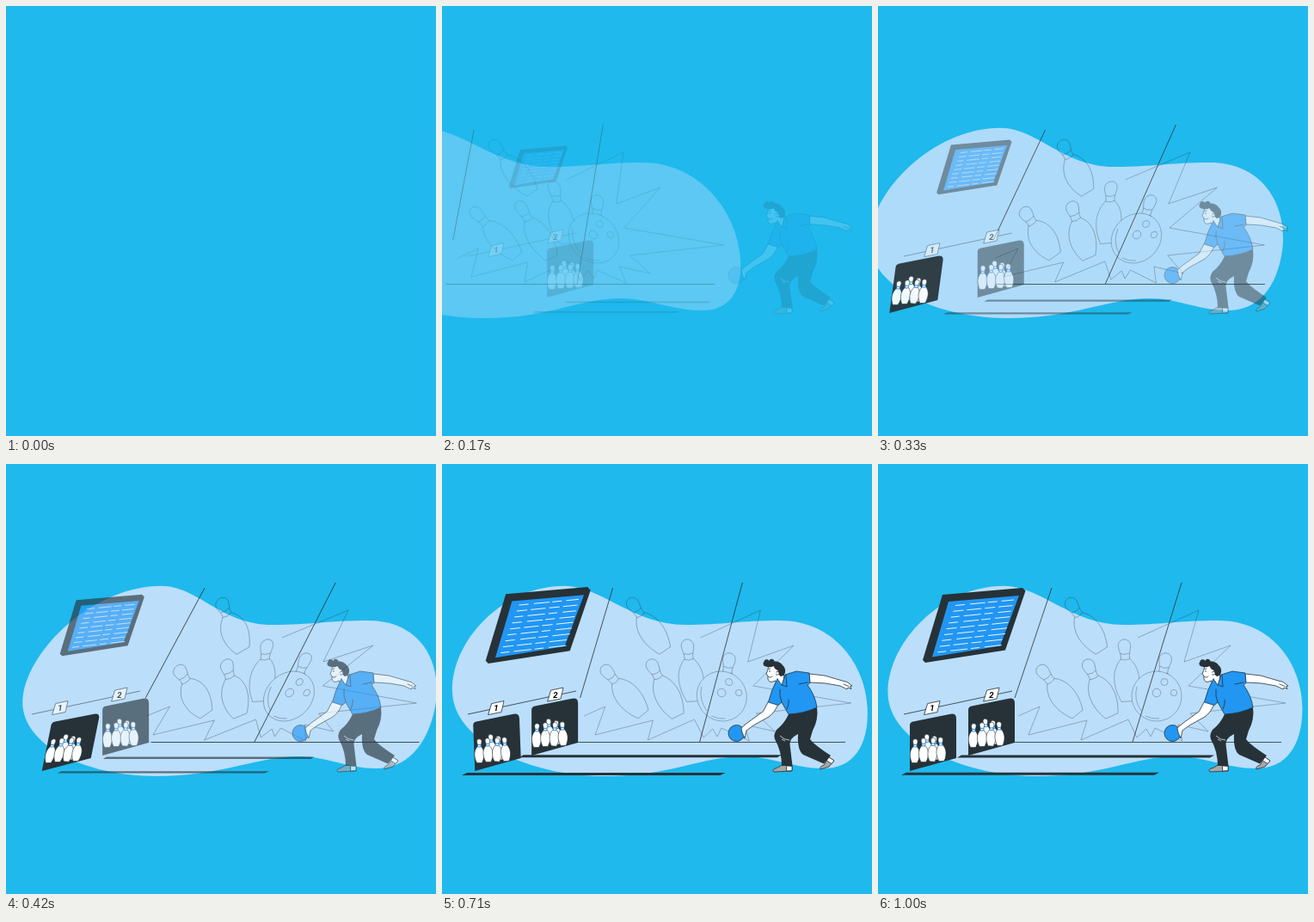
Write an HTML page that moves like this. It is 500 px wide and 500 px high and loops after 1040 ms.

```html
<!DOCTYPE html>
<html lang="en">
<head>
<meta charset="utf-8">
<title>Bowling alley</title>
<style>
  html, body { margin: 0; width: 100%; height: 100%; overflow: hidden; background: #1fb9ed; }
  svg { display: block; width: 100%; height: 100%; }
  .line { fill: none; stroke: #263238; stroke-width: .8; }
  .faint { fill: none; stroke: #263238; stroke-width: .7; stroke-opacity: .45; }
  .dark { fill: #263238; }
  .blue { fill: #2196f3; }
  .ink { stroke: #263238; stroke-width: .8; stroke-linejoin: round; stroke-linecap: round; }
  .white { fill: #fff; }
  .grey { fill: #a6a6a6; }
  .none { fill: none; }
  text { font: italic bold 9.5px Roboto, Arial, sans-serif; text-anchor: middle; }
</style>
</head>
<body>
<svg viewBox="0 0 500 500">
  <defs>
    <path id="pin" d="M-3 0C-7-8-6-15-2-19C-1.5-21-2.8-23-2.8-25A2.8 2.8 0 0 1 2.8-25C2.8-23 1.5-21 2-19C6-15 7-8 3 0Z"/>
    <path id="bands" d="M-2.1-21.5Q0-20.6 2.1-21.5M-2.1-19Q0-18 2.1-19"/>
    <g id="lane">
      <path class="dark" d="M105 286Q105 282 109 281.500L151 273Q159 271 159 278V324L105 339Z"/>
      <g id="rack"></g>
    </g>
    <clipPath id="offBall">
      <path clip-rule="evenodd" d="M0 0H500V500H0ZM295 270a29 29 0 1 0 58 0a29 29 0 1 0-58 0Z"/>
    </clipPath>
  </defs>

  <path data-move="speed" data-cy="252" fill="#bbdefb" d="M11.500 266C11.500 206 75 141.700 146 141.700C190 141.700 225 187 285 187C330 187 350 182 395 182C460 182 493.500 235 493.500 284C493.500 328 474 354 440 354C405 354 380 340 347 340C300 340 260 363 185 363C97 363 11.500 322 11.500 266Z"/>

  <g data-move="speed" data-cy="237" class="faint">
    <g clip-path="url(#offBall)">
      <path d="M302 202L373 170L356 230L410 211L361 258L474 278L363 290L384 311L349 303L354 322L322 307L317 317L312 308L301 318L291 297L236 321L243 298L175 315L188 282L163 293"/>
      <g id="flying"></g>
    </g>
    <circle cx="324" cy="270" r="29"/>
    <circle cx="333" cy="253.500" r="4"/>
    <circle cx="324" cy="266" r="4.800"/>
    <circle cx="344" cy="266" r="3.700"/>
    <path d="M301 259Q297 274 306 287M311 293Q319 297 327 296"/>
  </g>

  <path data-move="speed" data-cy="230.5" class="line" d="M202 144L159 272M353 138L296 323"/>
  <path data-move="speed" data-cy="323.5" class="line" d="M157 323.500H469"/>

  <g data-move="zoom" data-cx="209" data-cy="350" class="dark">
    <path d="M92 341.500L97 338.500H391L386 341.500Z"/>
    <path d="M27 361.700L33 358.700H327L321 361.700Z"/>
  </g>

  <g data-move="fade">
    <path class="line" d="M30 291L156 264"/>
    <path class="white ink" d="M58 278.500L72 275.500L69 288.500L54 291.500Z"/>
    <text x="63" y="287">1</text>
    <path class="white ink" d="M127 263L141 260L138 273L123 276Z"/>
    <text x="132" y="271.500">2</text>
  </g>

  <g data-move="slide"><use href="#lane"/></g>
  <g data-move="speed" data-cy="323"><use href="#lane" x="-68" y="18"/></g>

  <g data-move="zoom" data-cx="112" data-cy="187">
    <path class="dark" d="M75 152L168 144L171.500 147.500L148 216.500L55 231L52 228Z"/>
    <path class="blue" d="M82 160L164 153L142 211.500L63 224.500Z"/>
    <g id="scores" stroke="#fff" stroke-width=".9"></g>
  </g>

  <g data-move="fade">
    <path class="white ink" d="M427 244L445 246L462 251L471 253.500L477 258L474.500 258.500L476 261.500L472 260L471 262L463 258L446 255L428 254Z"/>
    <path class="none ink" d="M467 256L473 258.500"/>
    <circle class="blue ink" cx="342.500" cy="313" r="9.500"/>
    <path class="white ink" d="M380 276L391 279Q387 289 380 294L362 304L354 310L352 319L349 312L348 307L355 301L373 288Z"/>
    <path class="grey ink" d="M396 350L407 351L407 357L386 358Q383 355 389 353.500Z"/>
    <path class="white ink" d="M401 351L407 351.500L407 356.500L401 357Z"/>
    <path class="grey ink" d="M450 341L456 345L450 352L440 355Q438 352.500 444 350Z"/>
    <path class="white ink" d="M450 341L456 345L453 348.500L447.500 345Z"/>
    <path class="dark" d="M403 291L436 283Q438 297 431 310L428 320Q432 326 452 339L444 348.500L420 338Q413 333 414 314Q404 319 404.500 326L407.500 351L395 351Q395 334 387 320Q385 315 389 309Q398 302 403 291Z"/>
    <path d="M393 316Q398 321 404 321M395 320L399 322" fill="none" stroke="#fff" stroke-width=".7"/>
    <path class="white ink" d="M380 234Q379 240 377 244.500L379 246Q378 253 383 253.500L388 252L389 259L397 257L398 240L390 232Z"/>
    <path class="blue ink" d="M390 250L395 257L399 245L412 241L427 243L428 254.500L425 257Q434 269 436 283Q422 290 403 291L395 277L391 280.500L379.500 277Q383 262 390 250Z"/>
    <path class="none ink" d="M395 257L401 259L400 245M393 262Q392 270 395 277M415 256L425 254M401 285Q404 278 403 274"/>
    <path class="dark" d="M379 236C374 236 372 232 374.500 230C374 227 379 226 380.500 229C381 226 386 226 386.500 229.500C391 229 395 232 396 234C400 237 400 243 397 246L394 247L390.500 244V240Q387 239 385.500 235Q382 237 379 236Z"/>
    <path class="white ink" d="M388.500 242Q392 240 392 243.500Q391 246 388.500 245"/>
    <path class="none ink" d="M379.500 247.500Q382 249.500 384 247M380 238.500L382 238"/>
    <circle class="dark" cx="381" cy="241" r=".8"/>
  </g>
</svg>
<script>
  const $ = id => document.getElementById(id);

  const placed = ([x, y, turn], scale, content) =>
    `<g transform="translate(${x} ${y}) rotate(${turn}) scale(${scale})">${content}</g>`;

  const whitePin = `<use href="#pin" class="white" stroke="#263238" stroke-width=".6"/>
    <use href="#bands" fill="none" stroke="#2196f3" stroke-width="1.1"/>`;
  $('rack').innerHTML = [[127, 324, -5], [135, 326, -3],
    [110.5, 329.5, 2], [121, 328.5, 0], [131, 328, 3], [142, 327.5, -3]]
    .map(pin => placed(pin, 1, whitePin)).join('');

  const outlinePin = '<g style="stroke-width:.27"><use href="#pin"/><use href="#bands"/></g>';
  $('flying').innerHTML = [[260, 217, -33], [232, 291, -39], [272, 293, -25],
    [291, 276, -4], [323, 291, 10]].map(pin => placed(pin, 2.6, outlinePin)).join('');

  const dashes = ['11 6 18 3 11 5 20', '12 4 17 4 12 4 20', '10 5 20 4 10 6 20'];
  $('scores').innerHTML = Array.from({length: 9}, (_, r) => {
    const x = 90 - r * 2.6, y = 164.5 + r * 6.8;
    return `<path d="M${x} ${y}L${x + 68 + r} ${y - 6.5 - r * .25}" stroke-dasharray="${dashes[r % 3]}"/>`;
  }).join('');

  const bezier = (a, b, s) => 3 * (1 - s) ** 2 * s * a + 3 * (1 - s) * s * s * b + s ** 3;

  function ease(x) {
    if (x <= 0 || x >= 1) return x <= 0 ? 0 : 1;
    let lo = 0, hi = 1;
    for (let i = 0; i < 24; i++) {
      const mid = (lo + hi) / 2;
      if (bezier(.36, .5, mid) < x) lo = mid; else hi = mid;
    }
    return bezier(-.01, 1.38, lo);
  }

  // Each leg of the entrance is eased on its own, so it overshoots.
  function skewAt(t) {
    if (t < .6) return 20 - 30 * ease(t / .6);
    if (t < .8) return -10 + 12 * ease((t - .6) / .2);
    return 2 - 2 * ease((t - .8) / .2);
  }

  const moves = {
    speed(t, cx, cy) {
      const p = ease(t / .6);
      return [p, `translate(${250 * (p - 1)} ${cy}) skewX(${skewAt(t)}) translate(0 ${-cy})`];
    },
    zoom(t, cx, cy) {
      const p = ease(t);
      return [p, `translate(${cx} ${cy}) scale(${.5 + p / 2}) translate(${-cx} ${-cy})`];
    },
    slide: t => [ease(t), `translate(${20 * (1 - ease(t))} 0)`],
    fade: t => [ease(t), '']
  };

  const parts = [...document.querySelectorAll('[data-move]')];
  const LOOP = 1040, STEP = 1000 / 24, LEAD = 33;

  function draw(now) {
    const step = Math.min(24, Math.floor((now % LOOP + 5) / STEP));
    const t = step < 2 ? 0 : Math.min(1, (step * STEP + LEAD) / 1000);
    for (const el of parts) {
      const {move, cx, cy} = el.dataset;
      const [alpha, transform] = moves[move](t, +cx, +cy);
      el.setAttribute('opacity', Math.max(0, Math.min(1, alpha)));
      el.setAttribute('transform', transform);
    }
  }

  const start = performance.now();
  function tick() {
    draw(performance.now() - start);
    requestAnimationFrame(tick);
  }
  tick();
</script>
</body>
</html>
```
